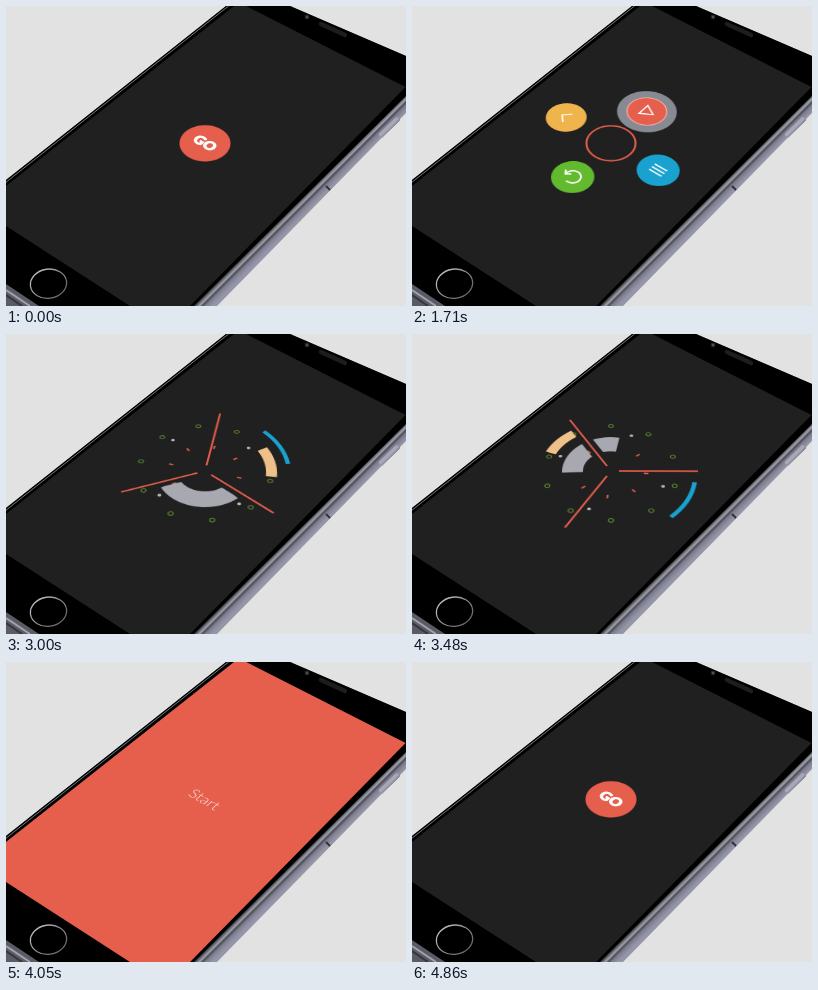
These frames come from a looping animation (400 px wide and 300 px high, 5.01 s). An HTML page with a canvas:

```html
<!DOCTYPE html>
<html lang="en">
<head>
<meta charset="utf-8">
<title>Radial menu on a phone</title>
<style>
  html, body { margin: 0; width: 100%; height: 100%; overflow: hidden; background: #e2e2e2; }
  #stage { position: absolute; left: 0; top: 0; width: 400px; height: 300px; overflow: hidden; }
  #phone { position: absolute; left: 0; top: 0; }
  #screen {
    position: absolute; inset: 0; background: #202020;
    clip-path: polygon(232.8px -3.7px, 399.5px 81px, 184px 300px, 124px 300px, 0 220px, 0 180px);
  }
  /* Lays the flat interface onto the tilted glass, centred on the button. */
  #ui {
    position: absolute; left: -100.8px; top: -163px; width: 600px; height: 600px;
    transform-origin: 300px 300px;
    transform: matrix3d(1, 0, 0, 0, 0, .713, 0, -.0007, 0, 0, 1, 0, 0, 0, 0, 1);
  }
</style>
</head>
<body>
<div id="stage">
  <svg id="phone" width="400" height="300" viewBox="0 0 400 300" fill="none">
    <defs>
      <linearGradient id="metal" gradientUnits="userSpaceOnUse" x1="290" y1="199" x2="298.5" y2="207.5">
        <stop offset="0" stop-color="#4a4b52"/>
        <stop offset=".25" stop-color="#a0a1aa"/>
        <stop offset=".42" stop-color="#4a4b55"/>
        <stop offset=".6" stop-color="#7b7d8e"/>
        <stop offset="1" stop-color="#9495a6"/>
      </linearGradient>
      <linearGradient id="home" x1="0" y1="0" x2="1" y2="1">
        <stop offset="0" stop-color="#cfcfd2"/>
        <stop offset=".5" stop-color="#8c8c90"/>
        <stop offset="1" stop-color="#5c5c60"/>
      </linearGradient>
    </defs>
    <path d="M374.5 129L391 113" stroke="#6d6f7e" stroke-width="6" stroke-linecap="round"/>
    <path d="M220 0H284L400 50V107L211 300H0V174Z" fill="url(#metal)"/>
    <path d="M0 276L36 300H0Z" fill="#5a5b64"/>
    <path d="M0 284L24 300" stroke="#a0a1aa" stroke-width="2"/>
    <path d="M0 289L16 300" stroke="#35363c" stroke-width="2"/>
    <path d="M220 0H284L400 50V90L188 300H33L0 278V174Z" fill="#000"/>
    <path d="M222.5 0L0 176.2" stroke="#77787d"/>
    <path d="M374.5 128.5L390.5 113" stroke="#a6a8b6" stroke-width="3.6" stroke-linecap="round"/>
    <path d="M320 180l4 4" stroke="#30313a" stroke-width="2"/>
    <path d="M315 18L339 29" stroke="#1d1d1f" stroke-width="4.5" stroke-linecap="round"/>
    <circle cx="301" cy="11" r="2.4" fill="#25262b"/>
    <circle cx="301" cy="11" r="1" fill="#5a5c68"/>
    <ellipse cx="42.5" cy="277.7" rx="18.2" ry="14.6" transform="rotate(-8 42.5 277.7)" stroke="url(#home)" stroke-width="1.3"/>
  </svg>
  <div id="screen"><canvas id="ui" width="1200" height="1200"></canvas></div>
</div>
<script>
const LOOP = 5010, TAU = Math.PI * 2, DEG = Math.PI / 180, TILT = 38.9 * DEG;
const RED = '#e65e4c', YELLOW = '#f0b44c', GREEN = '#62ba2f', BLUE = '#19a2cf';
const DARK = '#202020', TAN = '#eec08a', GREY = '#a8a9b0';
const BUTTON = 25.5, ITEM = 21, ORBIT = 59;
const SPIN_START = 1920, SPIN_TIME = 581, SPIN_END = SPIN_START + SPIN_TIME;

const g = document.getElementById('ui').getContext('2d');

const clamp = x => Math.max(0, Math.min(1, x));
const span = (t, from, to) => clamp((t - from) / (to - from));
const easeOut = p => 1 - (1 - p) ** 3;
const easeIn = p => p ** 3;
const easeInOut = p => (1 - Math.cos(Math.PI * p)) / 2;

function disc(x, y, r, fill, alpha = 1) {
  if (r <= 0 || alpha <= 0) return;
  g.globalAlpha = alpha;
  g.fillStyle = fill;
  g.beginPath();
  g.arc(x, y, r, 0, TAU);
  g.fill();
  g.globalAlpha = 1;
}

function circle(x, y, r, color, width) {
  if (r <= 0) return;
  g.strokeStyle = color;
  g.lineWidth = width;
  g.beginPath();
  g.arc(x, y, r, 0, TAU);
  g.stroke();
}

function line(points, color, width, close) {
  g.strokeStyle = color;
  g.lineWidth = width;
  g.beginPath();
  points.forEach(([x, y]) => g.lineTo(x, y));
  if (close) g.closePath();
  g.stroke();
}

function placed(x, y, angle, scale, draw) {
  g.save();
  g.translate(x, y);
  g.rotate(angle);
  g.scale(scale, scale);
  draw();
  g.restore();
}

function label(text, font, alpha, y, weight) {
  if (alpha <= 0) return;
  placed(0, 0, TILT, 1, () => {
    g.globalAlpha = alpha;
    g.font = font;
    g.fillStyle = g.strokeStyle = '#fff';
    g.textAlign = 'center';
    g.lineWidth = weight;
    g.lineJoin = 'round';
    g.fillText(text, 0, y);
    if (weight) g.strokeText(text, 0, y);
  });
}
const goLabel = alpha => label('GO', '900 16.5px Lato, sans-serif', alpha, 5.9, .8);
const startLabel = alpha => label('Start', '300 17.3px Lato, sans-serif', alpha, 6.6, 0);

const icons = {
  play: () => line([[-4.5, -7.5], [-4.5, 7.5], [8, 0]], '#fff', 1.6, true),
  menu: () => [-4.5, 0, 4.5].forEach(y => line([[-7.5, y], [7.5, y]], '#fff', 1.7)),
  back: () => line([[2, -7.5], [-5.5, 0], [2, 7.5]], '#fff', 1.6),
  undo: () => {
    g.strokeStyle = '#fff';
    g.lineWidth = 1.8;
    g.beginPath();
    g.arc(0, 0, 8, 175 * DEG, 462 * DEG);
    g.stroke();
    line([[-11.5, -3], [-8, 1.5], [-3.5, -2]], '#fff', 1.8);
  }
};

// Clockwise from the top right, a quarter turn apart.
const items = [
  { color: RED, icon: icons.play },
  { color: BLUE, icon: icons.menu },
  { color: GREEN, icon: icons.undo },
  { color: YELLOW, icon: icons.back }
];
const at = (deg, r) => [Math.cos(deg * DEG) * r, Math.sin(deg * DEG) * r];
const homeAngle = i => -51.1 + 90 * i;

function item({ color, icon }, x, y, scale) {
  if (scale <= 0) return;
  disc(x, y, ITEM * scale, color);
  placed(x, y, TILT, scale, icon);
}

function touch(x, y, p) {
  if (p <= 0 || p >= 1) return;
  disc(x, y, 38 * (1 - (1 - p) ** 1.5), '#d7dceb', Math.min(1, 1.1 * (1 - p ** 1.8)));
}

function button(t) {
  touch(0, 0, span(t, 0, 300));
  const hollow = span(t, 780, 1050);
  if (hollow < 1) {
    disc(0, 0, BUTTON, RED);
    disc(0, 0, (BUTTON - 2) * easeInOut(hollow), DARK);
    goLabel(1 - span(t, 780, 900));
  } else {
    circle(0, 0, (BUTTON - 1) * (1 - easeIn(span(t, SPIN_END, 2650))), RED, 2);
  }
}

const spin = t => 720 * easeInOut(span(t, SPIN_START, SPIN_END));

function menu(t) {
  const turned = spin(t);
  for (let i = 3; i > 0; i--) {
    if (turned >= 90 * i) continue;
    const start = 1110 + 90 * i;
    item(items[i], ...at(homeAngle(i), ORBIT), easeInOut(span(t, start, start + 270)));
  }
  if (t < SPIN_START) {
    const [x, y] = at(homeAngle(0), ORBIT);
    const p = span(t, 1530, 1800);
    touch(x, y, p);
    item(items[0], x, y, easeInOut(span(t, 1110, 1380)));
    if (p > 0 && p < 1) circle(x, y, ITEM - .5, '#f3b3a8', 1.2);
  }
}

function comet(t) {
  const fall = easeIn(span(t, SPIN_END, 2640));
  const copies = 24, lag = 57;
  for (let k = copies; k > 0; k--) {
    const a = homeAngle(0) + spin(t - lag * k / copies);
    const fade = Math.min(1, (1 - k / copies) * 2.6 + .04) ** 1.5;
    if (t < SPIN_END + lag) disc(...at(a, ORBIT * (1 - fall)), ITEM * (1 - fall * .5), RED, fade);
  }
  item(items[0], ...at(homeAngle(0) + spin(t), ORBIT * (1 - fall)), 1 - fall * .5);
}

function arc(r0, r1, from, sweep, color) {
  g.strokeStyle = color;
  g.lineWidth = r1 - r0;
  g.beginPath();
  g.arc(0, 0, (r0 + r1) / 2, from * DEG, (from + sweep) * DEG);
  g.stroke();
}

function around(count, phase, draw) {
  for (let i = 0; i < count; i++) draw(phase + i * 360 / count);
}

function burst(t) {
  const scale = easeOut(span(t, 2640, 2880)) * (1 - easeIn(span(t, 3570, 3750)));
  if (scale <= 0) return;
  const d = (t - 3000) / 480;
  const lines = 40.5 + 79.5 * d;
  placed(0, 0, 0, scale, () => {
    arc(28, 49, 49 + 128 * d, 103, GREY);
    arc(61, 72, -28 - 129 * d, 35, TAN);
    // The spokes cut gaps into the wide arcs only; the dots lie beneath.
    g.globalCompositeOperation = 'destination-out';
    around(3, lines, a => line([at(a, 20), at(a, 78)], DARK, 13));
    g.globalCompositeOperation = 'destination-over';
    around(10, 12 + 6 * d, a => circle(...at(a, 66), 2.4, '#5e8f33', 1.1));
    around(4, 53.5 - 31 * d, a => disc(...at(a, 55.5), 1.8, '#b9bac0'));
    around(8, 15.5 + 35 * d, a => line([at(a, 33), at(a, 37.5)], RED, 1.8));
    g.globalCompositeOperation = 'source-over';
    arc(82, 86.5, -43.5 + 54 * d, 36.5, BLUE);
    around(3, lines, a => line([at(a, 8), at(a, 87)], RED, 2));
  });
}

function start(t) {
  const grow = easeIn(span(t, 3700, 3990));
  const shrink = easeInOut(span(t, 4530, 4830));
  disc(0, 0, t < 4500 ? 310 * grow : 310 + (BUTTON - 310) * shrink, RED);
  startLabel(span(t, 3900, 4080) * (1 - span(t, 4500, 4620)));
  goLabel(span(t, 4710, 4860));
}

function draw(t) {
  g.setTransform(2, 0, 0, 2, 600, 600);
  g.clearRect(-300, -300, 600, 600);
  if (t < 2650) button(t);
  if (t >= 1100 && t < SPIN_END) menu(t);
  if (t >= SPIN_START && t < 2640) comet(t);
  if (t >= 2640 && t < 3760) burst(t);
  if (t >= 3700) start(t);
}

const begin = performance.now();
function frame() {
  draw((performance.now() - begin) % LOOP);
  requestAnimationFrame(frame);
}
frame();
</script>
</body>
</html>
```
